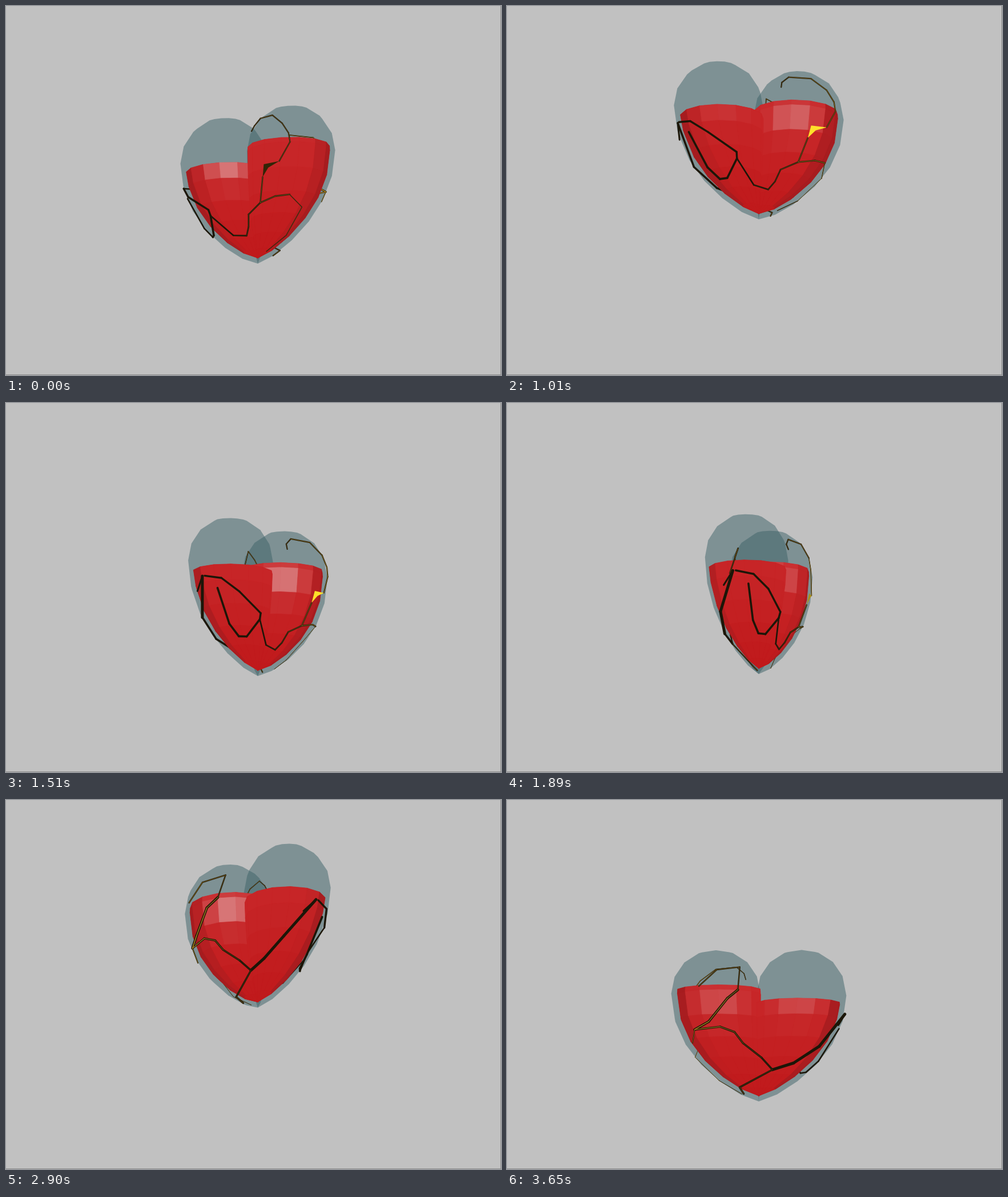
Write an HTML page with a canvas that moves like this. It is 867 px wide and 646 px high and loops after 3770 ms.

```html
<!DOCTYPE html>
<html lang="en">
<head>
<meta charset="utf-8">
<title>Turning heart</title>
<style>
html, body { margin: 0; width: 100%; height: 100%; overflow: hidden; background: #c1c1c1; }
canvas { display: block; }
</style>
</head>
<body>
<canvas id="stage" width="867" height="646"></canvas>
<script>
const ctx = document.getElementById('stage').getContext('2d');
const LOOP = 3770, STEP = 125.8, AXIS = 441;

// The heart is two lobes, each a stack of elliptical rings that taper to one tip.
// x runs across the front, y up from the tip, z out of the front.
const SPREAD = 75, WIDE = 80, DEEP = 73, BELLY = 187, DOME = 78, SIDES = 14;

const clamp = (v, lo = 0, hi = 1) => Math.max(lo, Math.min(hi, v));
const mix = (a, b, k) => a + (b - a) * k;
const blend = (a, b, k) => `rgb(${a.map((v, i) => Math.round(mix(v, b[i], k)))})`;
const range = n => [...Array(n).keys()];

// Relative ring size at a height
const girth = y => y < BELLY
  ? Math.sin(Math.PI / 2 * (y / BELLY) ** 0.75)
  : Math.sqrt(Math.max(0, 1 - ((y - BELLY) / DOME) ** 2));
const centre = y => SPREAD * (y < BELLY ? girth(y) : 1);

const levels = [
  ...range(7).map(k => BELLY * (k / 6) ** 1.5),
  ...range(4).map(k => BELLY + DOME * Math.sin((k + 1) * Math.PI / 8))
];

function makeLobe(side, top = Infinity, shrink = 1, lift = 0) {
  const heights = levels.filter(y => y < top);
  if (top < Infinity) heights.push(top);
  const rings = heights.map(y => range(SIDES).map(j => {
    const a = j / SIDES * 2 * Math.PI, s = girth(y);
    return [
      (side * centre(y) + WIDE * s * Math.sin(a)) * shrink,
      lift + y * (lift ? 0.95 : 1),
      DEEP * s * Math.cos(a) * shrink
    ];
  }));
  return { side, heights, rings };
}

const glass = [-1, 1].map(side => makeLobe(side));
const liquid = [makeLobe(-1, 170, 0.93, 10), makeLobe(1, 195, 0.93, 10)];

// Puts a point of the front (1) or back (-1) view on the surface
function onSurface(x, y, face) {
  let u = (Math.abs(x) - centre(y)) / (WIDE * girth(y));
  if (y < BELLY) u = Math.max(0, u);
  return [x, y, face * DEEP * girth(y) * Math.sqrt(Math.max(0, 1 - u * u))];
}

const crack = (face, width, path) => ({
  width,
  pts: path.split(' ').map(p => onSurface(...p.split(',').map(Number), face))
});
const cracks = [
  crack(1, 2.6, '107,98 84,96 52,89 21,74 14,55 4,42 -24,46 -62,83'),
  crack(1, 2.4, '52,89 66,130'),
  crack(1, 2.2, '102,153 121,185 118,201 104,220 77,239 40,241 27,230 24,220'),
  crack(1, 3.4, '-62,83 -64,93 -115,124 -141,146 -151,152'),
  crack(1, 3.6, '-62,83 -72,54 -82,54 -104,73 -140,130'),
  crack(1, 1.4, '107,98 112,80 70,38 30,15'),
  crack(-1, 3, '-140,130 -151,152'),
  crack(-1, 5, '-151,152 -107,91 -62,61 -25,50'),
  crack(-1, 3.2, '-25,50 33,22 26,12'),
  crack(-1, 3.4, '-25,50 -6,70 26,94 41,113 66,122 111,119'),
  crack(-1, 4.5, '111,119 86,131 53,171 35,187'),
  crack(-1, 2.4, '35,187 32,229 72,222 103,193'),
  crack(-1, 2, '111,119 115,98')
];
const chip = crack(1, 0, '71,151 102,153 80,144 66,130').pts;

function hull(pts) {
  const sorted = [...pts].sort((a, b) => a[0] - b[0] || a[1] - b[1]);
  const half = list => {
    const out = [];
    for (const p of list) {
      while (out.length > 1) {
        const [a, b] = out.slice(-2);
        if ((b[0] - a[0]) * (p[1] - a[1]) - (b[1] - a[1]) * (p[0] - a[0]) > 0) break;
        out.pop();
      }
      out.push(p);
    }
    return out.slice(0, -1);
  };
  return [...half(sorted), ...half(sorted.reverse())];
}

function trace(pts) {
  ctx.beginPath();
  pts.forEach(([x, y]) => ctx.lineTo(x, y));
}

function fill(pts, colour) {
  trace(pts);
  ctx.fillStyle = colour;
  ctx.fill();
}

function line(pts, colour, width) {
  trace(pts);
  ctx.strokeStyle = colour;
  ctx.lineWidth = width;
  ctx.stroke();
}

// Quick at the bottom, lingering at the top
function tipHeight(step) {
  const period = 15.7, low = 13.45;
  const away = Math.abs(step - low - period * Math.round((step - low) / period));
  return 352 + 182 * (1 - away / (period / 2)) ** 1.8;
}

function draw(step) {
  const angle = (-39 + 7.5 * step) * Math.PI / 180;
  const cos = Math.cos(angle), sin = Math.sin(angle);
  const tip = tipHeight(step);
  const tilt = 0.19 + (485 - tip) * 0.0012; // the higher it floats, the more it shows its underside
  const project = ([x, y, z]) =>
    [AXIS + x * cos + z * sin, tip - y - (z * cos - x * sin) * tilt];

  function drawLiquid({ side, heights, rings }) {
    const nearness = -side * SPREAD * sin;
    const flat = rings.map(r => r.map(project));
    fill(hull(flat.flat()), '#c41b1d');
    for (let i = 0; i < flat.length - 1; i++) for (let j = 0; j < SIDES; j++) {
      const n = (j + 1) % SIDES;
      const [a, b, c, d] = [flat[i][j], flat[i][n], flat[i + 1][n], flat[i + 1][j]];
      const area = (c[0] - a[0]) * (d[1] - b[1]) - (c[1] - a[1]) * (d[0] - b[0]);
      if (area >= 0) continue;
      const y = (heights[i] + heights[i + 1]) / 2;
      const reach = 0.93 * girth(y) * (SPREAD * Math.abs(cos) + 76);
      const rim = clamp((Math.abs((a[0] + b[0] + c[0] + d[0]) / 4 - AXIS) / reach - 0.8) * 6);
      const face = Math.max(0, Math.cos((j + 0.5) / SIDES * 2 * Math.PI + angle));
      const shine = Math.exp(-(((y - 160) / 26) ** 2)) * face ** 6 * clamp(0.25 - nearness / 170);
      const base = [mix(192, 200, y / 190), mix(25, 40, y / 190), mix(27, 42, y / 190)];
      const lit = base.map((v, k) => mix(v, [230, 190, 190][k], shine));
      const colour = blend(lit, [166, 28, 31], rim * (1 - shine));
      fill([a, b, c, d], colour);
      line([a, b, c, d, a], colour, 0.7);
    }
  }

  const facing = ([x, y, z]) => {
    const out = Math.sign(x) * (y < BELLY ? Math.max(0, Math.abs(x) - centre(y)) : Math.abs(x) - SPREAD);
    return z * cos / DEEP ** 2 - out * sin / WIDE ** 2 > 0;
  };
  const midpoint = (a, b) => a.map((v, i) => (v + b[i]) / 2);
  const glint = p => clamp(Math.abs(project(p)[0] - AXIS) / 110) ** 3;

  function drawCracks(front) {
    const segments = cracks.flatMap(({ width, pts }) => pts.slice(1)
      .map((b, i) => ({ width, a: pts[i], b, mid: midpoint(pts[i], b) })))
      .filter(s => facing(s.mid) === front);
    const thin = front ? 1 : 0.7;
    for (const { width, a, b } of segments) line([a, b].map(project), '#1c1608', width * thin);
    for (const { width, a, b, mid } of segments) {
      const gilt = clamp((mid[0] + 30) / 90);
      const gold = blend([122, 92, 28], [205, 160, 35], glint(mid) * 0.6);
      ctx.globalAlpha = gilt;
      line([a, b].map(project), gold, width * 0.35);
      ctx.globalAlpha = 1;
    }
    if (facing(chip[0]) === front)
      fill(chip.map(project), blend([43, 29, 6], [255, 224, 42], glint(chip[1])));
  }

  ctx.fillStyle = '#c1c1c1';
  ctx.fillRect(0, 0, 867, 646);
  ctx.fillStyle = '#8c8c8c';
  ctx.fillRect(866, 0, 1, 646);
  ctx.fillRect(0, 645, 867, 1);
  ctx.lineCap = ctx.lineJoin = 'round';

  for (const lobe of glass) fill(hull(lobe.rings.flat().map(project)), 'rgba(61,99,105,.5)');
  drawCracks(false);
  const farFirst = sin > 0 ? [liquid[1], liquid[0]] : liquid;
  farFirst.forEach(drawLiquid);
  drawCracks(true);
}

function tick() {
  draw(Math.min(29, Math.floor(performance.now() % LOOP / STEP)));
  requestAnimationFrame(tick);
}
tick();
</script>
</body>
</html>
```
